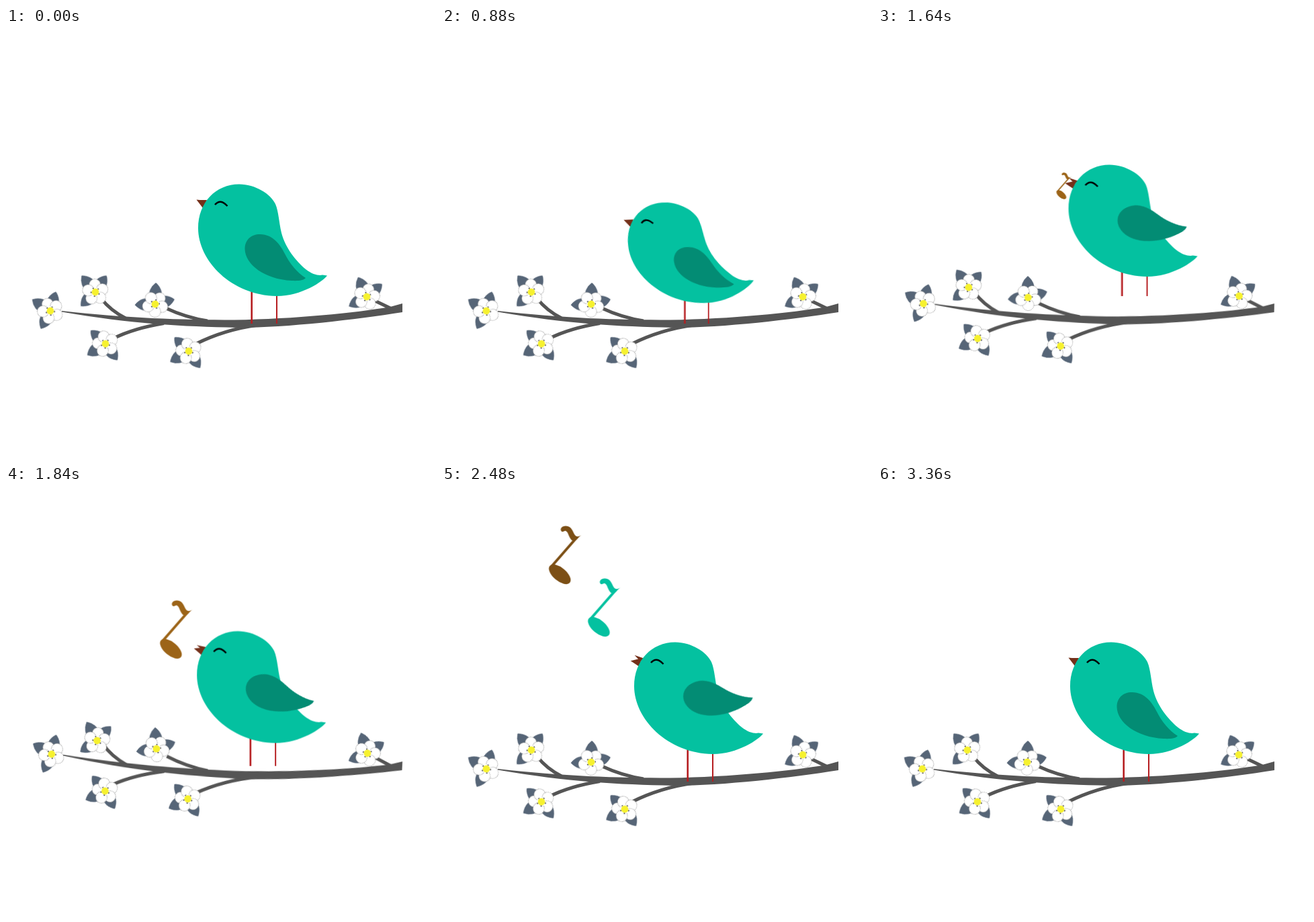
These frames come from a looping animation (640 by 640 pixels, 3600 ms). An HTML page:

```html
<!DOCTYPE html>
<html lang="en">
<head>
<meta charset="utf-8">
<title>Singing bird</title>
<style>
  @property --open { syntax: "<number>"; inherits: true; initial-value: 0; }

  html, body { margin: 0; width: 100%; height: 100%; overflow: hidden; background: #fff; }
  svg { display: block; width: 100vw; height: 100vh; }

  .branch, .sway, .hop, .crouch, .leap, .bend, .wing, .beak, .fly, .show, .darken {
    animation: 3.6s ease-in-out infinite;
  }

  .branch { transform-origin: 590px 417px; animation-name: branch; }
  .sway { animation-name: sway; }
  .hop { animation-name: hop; }
  .crouch { transform-origin: 380px 330px; animation-name: crouch; }
  .leap { animation-name: leap; }
  .bend { transform-origin: 384px 440px; animation-name: bend; }
  .wing { transform-origin: 352px 314px; animation-name: flap; }
  .beak { animation-name: sing; }
  .upper { transform-origin: 298px 260px; transform: rotate(calc(var(--open) * 25deg)); }
  .lower { transform-origin: 297px 262px; transform: rotate(calc(var(--open) * -25deg)) scale(calc(1 + var(--open) * .12)); }
  .fly { animation-name: fly; animation-timing-function: linear; }
  .late { animation-delay: .48s; animation-fill-mode: backwards; }
  .show { animation-name: show; animation-timing-function: step-end; }
  .show.second { animation-name: show-second; }
  .darken { animation-name: darken; animation-timing-function: linear; }

  @keyframes branch {
    0%, 32.2% { transform: none; }
    36.1% { transform: rotate(-1.9deg) scaleX(.997); }
    51.1% { transform: rotate(2.4deg) scaleX(.997); }
    59.5%, 100% { transform: none; }
  }
  @keyframes sway {
    0%, 40% { transform: none; }
    51.1% { transform: translateY(var(--y)) rotate(var(--r)); }
    59.5%, 100% { transform: none; }
  }
  @keyframes crouch {
    0% { transform: matrix(1, 0, 0, 1, 0, 0); animation-timing-function: cubic-bezier(.35, .1, .45, 1); }
    23.33% { transform: matrix(.934, -.072, .1057, .92, -11.7, 17.2); animation-timing-function: cubic-bezier(.7, 0, .75, .6); }
    36.39%, 100% { transform: matrix(1, 0, 0, 1, 0, 0); }
  }
  @keyframes bend {
    0% { transform: translateX(0) scaleX(1); animation-timing-function: cubic-bezier(.35, .1, .45, 1); }
    23.33% { transform: translateX(-5.3px) scaleX(.947); animation-timing-function: cubic-bezier(.7, 0, .75, .6); }
    36.39%, 100% { transform: translateX(0) scaleX(1); }
  }
  /* The jump rises and falls as a parabola. */
  @keyframes hop {
    0%, 36.39% { transform: translate(0, 0); animation-timing-function: cubic-bezier(.33, .67, .67, 1); }
    45.28% { transform: translate(-2.5px, -29px); animation-timing-function: cubic-bezier(.33, 0, .67, .33); }
    54.17% { transform: translate(-1px, 0); animation-timing-function: cubic-bezier(.33, .67, .67, 1); }
    57.78% { transform: translate(-1px, 11px); }
    60% { transform: translate(-1px, 8px); }
    67.8%, 100% { transform: translate(0, 0); }
  }
  @keyframes leap {
    0%, 36.39% { transform: translate(0, 0); animation-timing-function: cubic-bezier(.33, .67, .67, 1); }
    45.28% { transform: translate(-2.5px, -41px); animation-timing-function: cubic-bezier(.33, 0, .67, .33); }
    54.17% { transform: translate(-1px, 0); }
    60% { transform: translate(-1px, -2px); }
    67.8%, 100% { transform: translate(0, 0); }
  }
  @keyframes flap {
    0%, 31.1% { transform: rotate(0); }
    41.1% { transform: rotate(-30.5deg); }
    51.1% { transform: rotate(-20deg); }
    60.6% { transform: rotate(-43.5deg); }
    77.8% { transform: rotate(-17.5deg); }
    93.3%, 100% { transform: rotate(0); }
  }
  @keyframes sing {
    0%, 32% { --open: 0; }
    40% { --open: 1; }
    51.1% { --open: .5; }
    60% { --open: 1; }
    77.8% { --open: .55; }
    90%, 100% { --open: 0; }
  }
  @keyframes fly {
    0%, 44.4% { transform: translate(281px, 240px) scale(.3); }
    46.67% { transform: translate(272.5px, 230.5px) scale(.6); }
    51.11% { transform: translate(253.5px, 214px) scale(1); }
    60% { transform: translate(229.5px, 148.5px) scale(1); }
    64.44% { transform: translate(209px, 124px) scale(1); }
    78.89%, 100% { transform: translate(126px, 56px) scale(1); }
  }
  @keyframes show {
    0% { opacity: 0; }
    45% { opacity: 1; }
    79.5%, 100% { opacity: 0; }
  }
  @keyframes show-second {
    0% { opacity: 0; }
    58% { opacity: 1; }
    79.5%, 100% { opacity: 0; }
  }
  @keyframes darken {
    0%, 60% { fill: #9c6418; stroke: #9c6418; }
    77.8%, 100% { fill: #5c3a12; stroke: #5c3a12; }
  }
</style>
</head>
<body>
<svg viewBox="0 0 640 640">
  <defs>
    <path id="leaf" d="M0 0C8 -15 23 -11 32 0C24 10 8 15 0 0Z" fill="#566577"/>
    <g id="note">
      <ellipse cx="-8" cy="28.5" rx="19.5" ry="9.8" transform="rotate(40 -8 28.5)" stroke="none"/>
      <path d="M-20.5 17L17 -26" fill="none" stroke-width="3.8"/>
      <path stroke="none" d="M24.5 -30.5C20.5 -27 17 -27 14.5 -30C11 -35 10 -43.5 1 -43.5C-5 -43.5 -8.5 -39 -5.5 -35.5C-3 -33.5 -1 -37 1 -36C5 -34 5 -27 10 -22C16 -19 19 -26 24.5 -30.5Z"/>
    </g>
    <g id="flower">
      <use href="#leaf"/>
      <use href="#leaf" transform="rotate(74) scale(.93)"/>
      <use href="#leaf" transform="rotate(-94) scale(.95)"/>
      <g id="petals" fill="#fff" stroke="#777" stroke-width=".7" stroke-dasharray="1.5 1"></g>
      <circle r="6" fill="#fff"/>
      <circle r="6.3" fill="none" stroke="#4a4a4a" stroke-width="1.6" stroke-dasharray="2 5.92"/>
      <circle r="5.4" fill="#f6f12f"/>
    </g>
  </defs>

  <g class="branch">
    <path fill="#555" d="M83 421C180 432 260 434.5 340 434.5C430 433 520 424 572 415L590 410V423C520 434 420 446 345 446C260 444 190 441 83 422.5Z"/>
    <path fill="none" stroke="#555" stroke-width="5" d="M142 403Q155 420 178 432M238 417Q268 431 300 436M160 462Q190 447 235 439.5M283 470Q325 449 375 442M545 404L573 417.5"/>
    <g id="flowers"></g>
  </g>

  <g class="leap">
    <g class="bend" fill="none" stroke="#b51d20">
      <path d="M365.7 380V440" stroke-width="2.6"/>
      <path d="M403 380V440" stroke-width="2"/>
    </g>
  </g>

  <g class="hop">
    <g class="crouch">
      <g class="beak" fill="#74301a">
        <path class="lower" d="M283.5 255.5L298 257L293 268Z"/>
        <path class="upper" d="M284.5 256L299 256L296 262Z"/>
      </g>
      <path fill="#04c1a0" d="M347 232.5C371 232.5 394 247 401 262C406 274 406 288 410 305C416 328 432 347 446 359C456 367 466 369 471 367.5L478 368.5C472 377 440 399 403 399C335 398 286 346 286 298C286 260 312 232.5 347 232.5Z"/>
      <path fill="none" stroke="#000" stroke-width="2.5" d="M311 263Q319 253.5 329.5 265"/>
      <path class="wing" fill="#038c74" d="M378 307C398 307 409 324 415 336C422 350 433 364 446 372C443 376 434 376.5 425 376C385 374 356 352 355.5 329C355.5 315 365 307 378 307Z"/>
    </g>
  </g>

  <g class="show">
    <g class="fly"><g class="darken"><use href="#note"/></g></g>
  </g>
  <g class="show second" fill="#04c1a0" stroke="#04c1a0">
    <g class="fly late"><use href="#note"/></g>
  </g>
</svg>
<script>
  // x, y, turn, then sway: lift, angle
  const flowers = [
    [66, 421, 212, 0, -5],
    [133, 393, 230, 5, 8],
    [222, 411, 272, -4.5, -8],
    [148, 470, 148, 2.5, 5],
    [272, 481, 150, -2, 1],
    [537, 400, 246, 0, 4]
  ];

  document.getElementById("petals").innerHTML = [36, 108, 180, 252, 324]
    .map(a => `<circle cx="11" r="8.5" transform="rotate(${a})"/>`).join("");

  document.getElementById("flowers").innerHTML = flowers
    .map(([x, y, turn, lift, angle]) => `
      <g transform="translate(${x} ${y})">
        <g class="sway" style="--y:${lift}px;--r:${angle}deg">
          <use href="#flower" transform="rotate(${turn})"/>
        </g>
      </g>`).join("");
</script>
</body>
</html>
```
